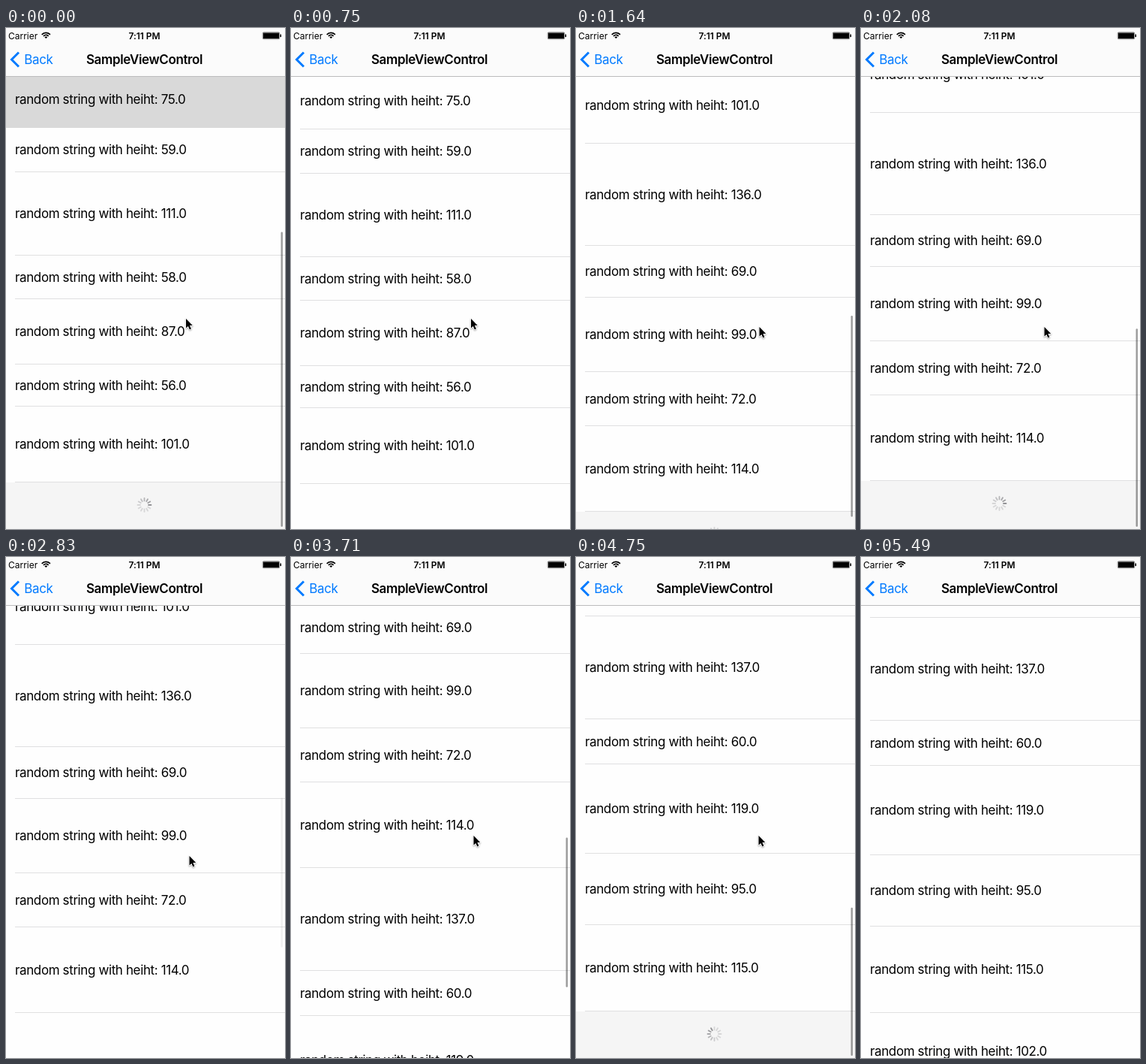
Animation of 372 by 667 pixels, one loop 5.91 s. Source, as an HTML page with a canvas:

```html
<!DOCTYPE html>
<html lang="en">
<head>
<meta charset="utf-8">
<title>Load more list</title>
<style>
html, body { margin: 0; width: 100%; height: 100%; overflow: hidden; background: #fefefe; }
canvas { display: block; }
</style>
</head>
<body>
<canvas id="stage" width="372" height="667"></canvas>
<script>
const ctx = document.getElementById('stage').getContext('2d');
const W = 372, H = 667, NAV = 64, FOOTER = 60;
const ABOVE = 430; // rows scrolled away before the first one listed
const LOOP = 5910, STEP = 148.2; // the picture refreshes once per step
const FONT = 'Inter, Roboto, sans-serif';

const heights = [75, 59, 111, 58, 87, 56, 101, 136, 69, 99, 72, 114, 137, 60, 119, 95, 115, 102, 90];

// Each pull flings the list to its loader; more rows arrive at `load`.
const pulls = [
  { start: -1340, dur: 895, load: 700, rows: 7, hand: [240, 387] },
  { start: 1122, dur: 636, load: 2780, rows: 12, hand: [244.5, 398] },
  { start: 3345, dur: 894, load: 5450, rows: 17, hand: [243.5, 371] }
];
const OVERSHOOT = 16, HALF_LIFE = STEP;
const POINTER_EXIT = 5330;

const clamp = v => Math.min(1, Math.max(0, v));
const smooth = v => v * v * (3 - 2 * v);
const mix = (a, b, k) => a + (b - a) * k;
const sum = rows => heights.slice(0, rows).reduce((a, b) => a + b, 0);
const restTop = pull => H - FOOTER - sum(pull.rows);

function stateAt(t) {
  const i = pulls.findLastIndex(p => t >= p.start);
  const pull = pulls[i], prev = pulls[Math.max(0, i - 1)];
  const age = t - pull.start, settle = age - pull.dur;
  const rest = restTop(pull);
  const top = settle < 0
    ? mix(restTop(prev), rest - OVERSHOOT, smooth(age / pull.dur))
    : rest - OVERSHOOT * 2 ** (-settle / HALF_LIFE);
  const move = smooth(clamp(age / 340));
  const loaded = t >= pull.load;
  return {
    top: Math.round(top),
    rows: loaded ? (pulls[i + 1] || { rows: heights.length }).rows : pull.rows,
    selected: i === 0 && !loaded,
    bar: clamp(1 - (settle - 800) / 300),
    hand: pull.hand.map((v, j) => mix(prev.hand[j], v, move))
  };
}

function rect(x, y, w, h, color) {
  ctx.fillStyle = color;
  ctx.fillRect(x, y, w, h);
}

function text(str, x, y, { size = 17, weight = 400, color = '#000', align = 'left', track = -0.38 } = {}) {
  ctx.font = `${weight} ${size}px ${FONT}`;
  ctx.letterSpacing = track + 'px';
  ctx.textAlign = align;
  ctx.fillStyle = color;
  ctx.fillText(str, x, y);
}

function line(points, width, color, cap = 'butt') {
  ctx.lineWidth = width;
  ctx.strokeStyle = color;
  ctx.lineCap = cap;
  ctx.lineJoin = 'miter';
  ctx.beginPath();
  points.forEach(([x, y]) => ctx.lineTo(x, y));
  ctx.stroke();
}

function spinner(x, y, t) {
  const head = Math.floor(t / 1000 * 12);
  for (let i = 0; i < 12; i++) {
    const c = Math.cos(i * Math.PI / 6), s = Math.sin(i * Math.PI / 6);
    const age = (head - i + 120) % 12;
    const alpha = Math.max(0.22, 0.7 - age * 0.08);
    line([[x + c * 5.5, y + s * 5.5], [x + c * 9, y + s * 9]], 1.8, `rgba(105,105,110,${alpha})`, 'round');
  }
}

function list({ top, rows, selected }, t) {
  let y = top;
  heights.slice(0, rows).forEach((h, i) => {
    if (selected && i === 0) rect(0, y, W, h, '#d9d9d9');
    else rect(12, y + h - 1, W - 12, 1, '#e0e0e1');
    text(`random string with heiht: ${h.toFixed(1)}`, 12, Math.floor(y + h / 2) + 6);
    y += h;
  });
  if (y < H) {
    rect(0, y, W, H - y, '#f5f5f5');
    spinner(184.5, y + 30, t);
  }
}

function scrollBar({ top, rows, bar }) {
  const total = ABOVE + sum(rows) + FOOTER, max = total - (H - NAV);
  const offset = ABOVE + NAV - top, over = Math.max(0, offset - max);
  const len = 409000 / total;
  const y = NAV + 3 + clamp(offset / max) * (597 - len) + over;
  ctx.fillStyle = `rgba(0,0,0,${0.38 * bar})`;
  ctx.beginPath();
  ctx.roundRect(366.5, y, 2.5, len - over, 1.25);
  ctx.fill();
}

function wifi(x, y) {
  const from = -Math.PI * 0.76, to = -Math.PI * 0.24;
  ctx.strokeStyle = ctx.fillStyle = '#000';
  ctx.lineWidth = 1.7;
  ctx.lineCap = 'butt';
  for (const r of [4.6, 7.6]) {
    ctx.beginPath();
    ctx.arc(x, y, r, from, to);
    ctx.stroke();
  }
  ctx.beginPath();
  ctx.moveTo(x, y);
  ctx.arc(x, y, 2.6, from, to);
  ctx.fill();
}

function battery() {
  ctx.strokeStyle = '#000';
  ctx.lineWidth = 0.5;
  ctx.beginPath();
  ctx.roundRect(342.25, 5.75, 22.5, 9, 1.5);
  ctx.stroke();
  rect(343, 6.5, 21, 7.5, '#000');
  rect(365.5, 8.5, 1.5, 3.5, '#000');
}

function navBar() {
  rect(0, 0, W, NAV, '#fbfbfb');
  rect(0, NAV, W, 1, '#bcbcbd');
  text('Carrier', 3, 14.5, { size: 12, track: 0 });
  wifi(53.3, 14);
  text('7:11 PM', 184.5, 14.5, { size: 12, weight: 600, align: 'center', track: -0.05 });
  battery();
  line([[17, 32.5], [7.5, 42], [17, 51.5]], 3, '#007aff');
  text('Back', 24.3, 48, { color: '#007aff' });
  text('SampleViewControl', 184.5, 48, { weight: 600, align: 'center' });
}

function cursor(x, y) {
  ctx.save();
  ctx.translate(x, y);
  ctx.scale(0.84, 0.84);
  const arrow = new Path2D('M0 0V15L3.4 11.8 5.8 17.2 8.2 16.1 5.8 10.8H10.4Z');
  ctx.lineJoin = 'round';
  ctx.lineWidth = 2;
  ctx.strokeStyle = '#fff';
  ctx.shadowColor = 'rgba(0,0,0,0.35)';
  ctx.shadowBlur = 2;
  ctx.shadowOffsetY = 1;
  ctx.stroke(arrow);
  ctx.shadowColor = 'transparent';
  ctx.fillStyle = '#000';
  ctx.fill(arrow);
  ctx.restore();
}

function draw(time) {
  const t = Math.max(0, Math.floor((time - 1) / STEP)) * STEP;
  const state = stateAt(t);
  rect(0, 0, W, H, '#fefefe');
  list(state, t);
  scrollBar(state);
  navBar();
  if (t < POINTER_EXIT) cursor(...state.hand);
}

const start = performance.now();
function tick() {
  draw((performance.now() - start) % LOOP);
  requestAnimationFrame(tick);
}
tick();
</script>
</body>
</html>
```
